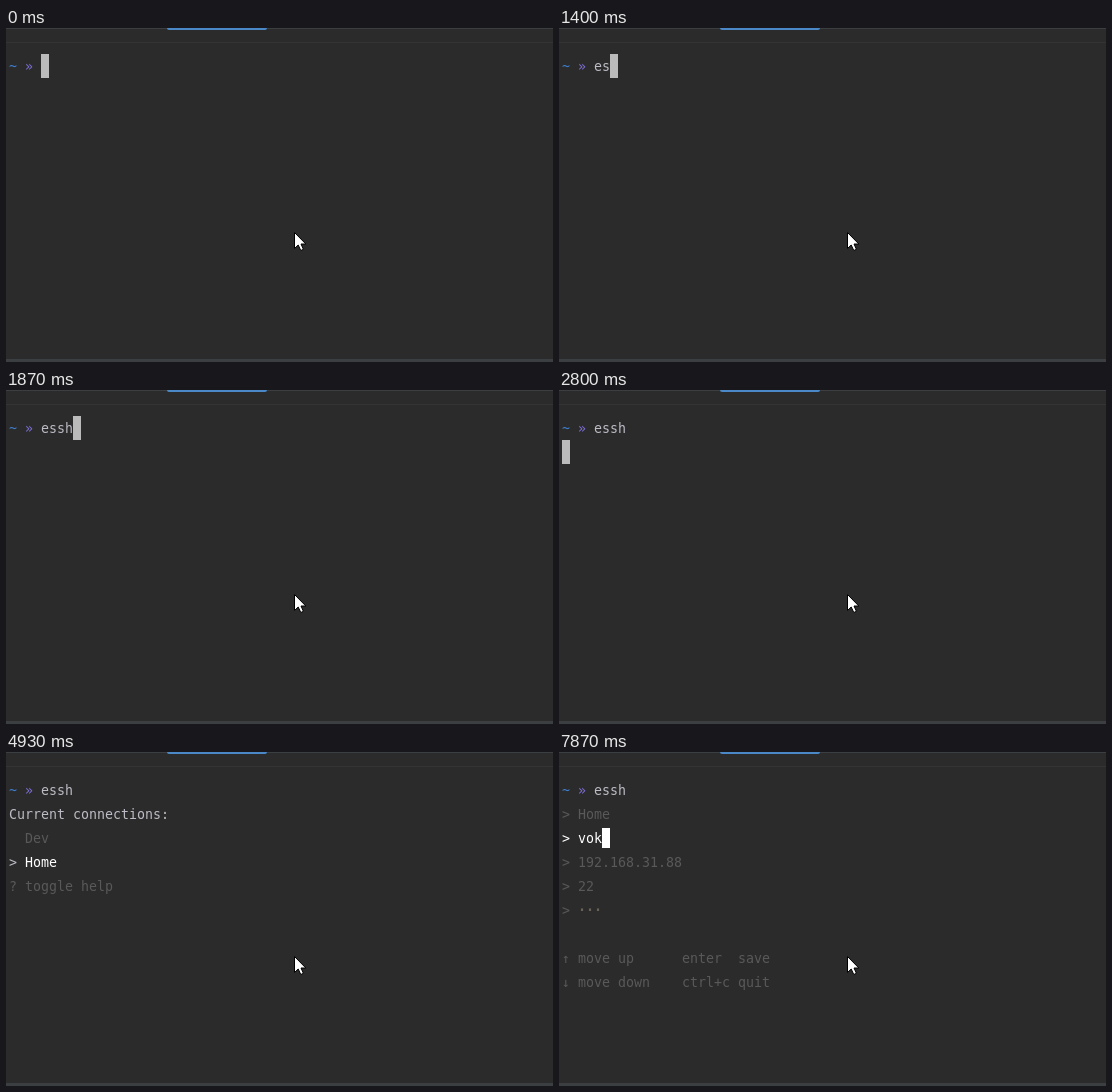
Write an HTML page with a canvas that moves like this. It is 547 px wide and 334 px high and loops after 8000 ms.

```html
<!DOCTYPE html>
<html lang="en">
<head>
<meta charset="utf-8">
<title>Terminal session</title>
<style>
  html, body { margin: 0; width: 100%; height: 100%; overflow: hidden; background: #2b2b2b; }
  canvas { display: block; }
</style>
</head>
<body>
<canvas id="stage" width="547" height="334"></canvas>
<script>
const ctx = document.getElementById("stage").getContext("2d");
const LOOP = 8000, LEFT = 3, TOP = 26, CELL = 8, LINE = 24;
const TEXT = "#bbbcc4", DIM = "#595959", WHITE = "#ffffff", CURSOR = "#bbbbbb";
const FONT = '13.29px "DejaVu Sans Mono", monospace';

function rect(x, y, w, h, color) {
  ctx.fillStyle = color;
  ctx.fillRect(x, y, w, h);
}

function print(col, row, text, color = TEXT, weight = "") {
  ctx.font = `${weight} ${FONT}`;
  ctx.fillStyle = color;
  ctx.fillText(text, LEFT + col * CELL, TOP + row * LINE + 17);
}

function cursor(col, row, color = CURSOR, inset = 0) {
  rect(LEFT + col * CELL, TOP + row * LINE + inset, CELL, LINE - 2 * inset, color);
}

function drawWindow() {
  rect(0, 0, 547, 334, "#2b2b2b");
  rect(0, 0, 547, 1, "#3c3f41");
  rect(0, 14, 547, 1, "#343434");
  rect(0, 331, 547, 3, "#3c3f41");
  ctx.fillStyle = "#4a88c7";
  ctx.beginPath();
  ctx.roundRect(161, -2, 100, 4, 2);
  ctx.fill();
}

function drawPointer() {
  const pointer = new Path2D("M288.5 204.5V220.5L292.2 217L294.8 222.5L297.4 221.3L295 216H299.8Z");
  ctx.fillStyle = WHITE;
  ctx.fill(pointer);
  ctx.strokeStyle = "#000";
  ctx.lineWidth = 1;
  ctx.stroke(pointer);
}

function drawPrompt(command) {
  print(0, 0, "~", "#3f7fd0");
  print(2, 0, "»", "#7d6fd6");
  print(4, 0, command);
}

function drawList(selected) {
  print(0, 1, "Current connections:");
  ["Dev", "Home"].forEach((name, i) => {
    const active = i === selected;
    if (active) print(0, i + 2, ">");
    print(2, i + 2, name, active ? WHITE : DIM);
  });
  print(0, 4, "? toggle help", DIM);
}

function drawForm(focused) {
  ["Home", "vok", "192.168.31.88", "22", "···"].forEach((value, i) => {
    const active = i === focused, masked = i === 4;
    print(0, i + 1, ">", active ? WHITE : DIM);
    print(2, i + 1, value, active ? WHITE : masked ? "#6a6458" : DIM, masked ? "bold" : "");
    if (active) cursor(2 + value.length, i + 1, WHITE, 2);
  });
  print(0, 7, "↑ move up      enter  save", DIM);
  print(0, 8, "↓ move down    ctrl+c quit", DIM);
}

function draw(t) {
  const typed = [1070, 1400, 1530, 1870].filter(time => t >= time).length;
  drawWindow();
  drawPrompt("essh".slice(0, typed));
  if (t < 2800) cursor(4 + typed, 0);
  else if (t < 2870) cursor(0, 1);
  else if (t < 5330) drawList(t < 4930 ? 0 : 1);
  else drawForm(t < 7870 ? 0 : 1);
  drawPointer();
}

function tick() {
  draw(performance.now() % LOOP);
  requestAnimationFrame(tick);
}
tick();
</script>
</body>
</html>
```
